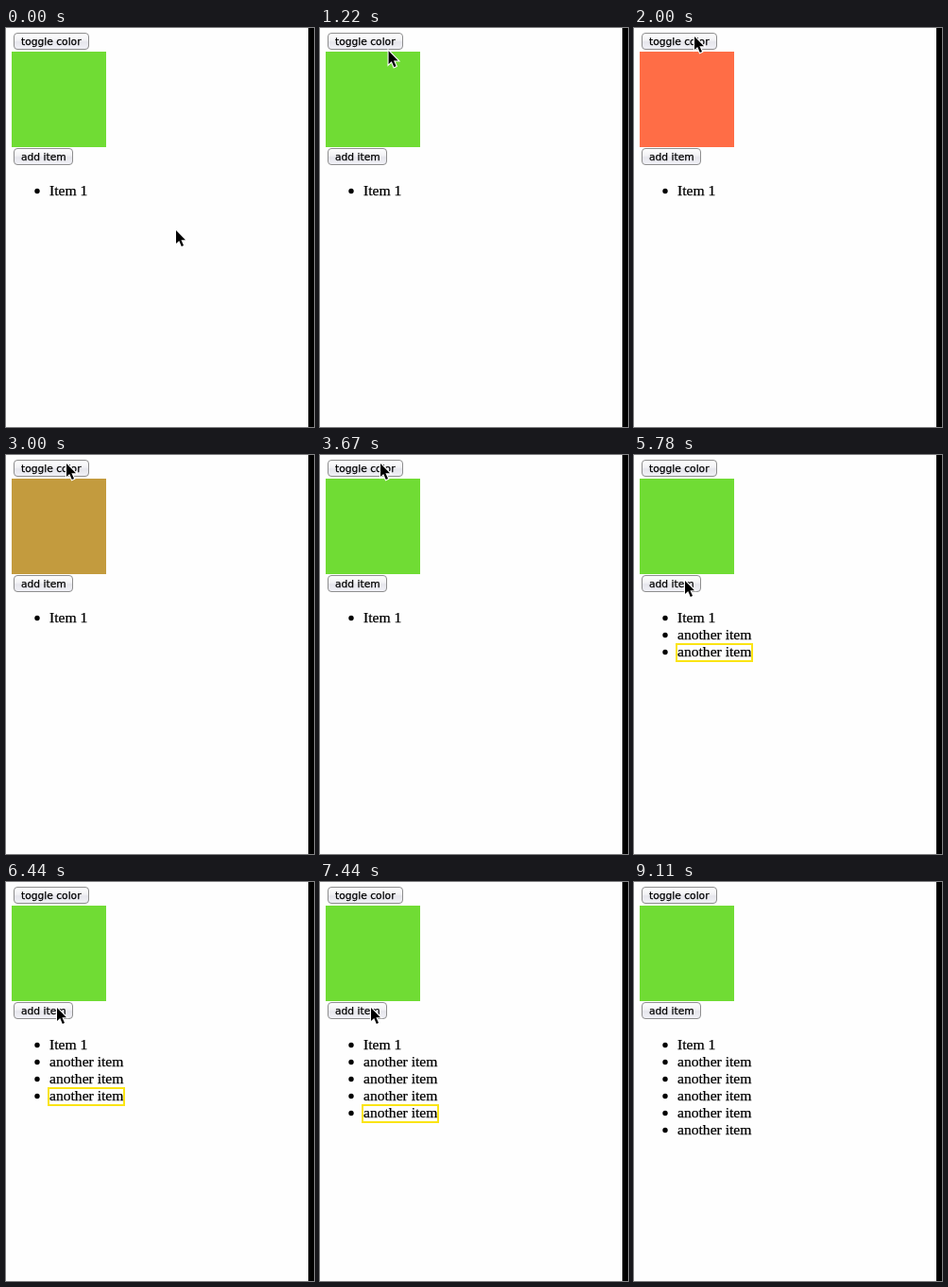
An HTML page with a canvas for the animation above (9.89 s loop, 326x422 px).

```html
<!DOCTYPE html>
<html lang="en">
<head>
<meta charset="utf-8">
<title>Toggle and add</title>
<style>
  html, body { margin: 0; width: 326px; height: 422px; overflow: hidden; }
  canvas { display: block; }
</style>
</head>
<body>
<canvas id="stage" width="326" height="422"></canvas>
<script>
const ctx = document.getElementById('stage').getContext('2d');
const LOOP = 9890, TICK = 1000 / 9;
const PAPER = '#fefefe';
const GREEN = [112, 220, 52], ORANGE = [255, 109, 70];
const ADDED = [45, 50, 57, 64, 72];      // ticks at which items appear
const GLOW = [0.3, 1, 1, 1, 0.4];        // highlight opacity per tick of age

// Eased progress from tick a to tick b
function ease(tick, a, b) {
  const p = Math.min(1, Math.max(0, (tick - a) / (b - a)));
  return p * p * (3 - 2 * p);
}

const mix = (from, to, p) => from.map((v, i) => v + (to[i] - v) * p);

// Black text, slightly emboldened
function drawText(text, x, y, font) {
  ctx.font = font;
  ctx.fillStyle = ctx.strokeStyle = '#000';
  ctx.lineWidth = 0.25;
  ctx.fillText(text, x, y);
  ctx.strokeText(text, x, y);
}

function drawButton(label, y, width) {
  const fill = ctx.createLinearGradient(0, y, 0, y + 18);
  fill.addColorStop(0, '#ffffff');
  fill.addColorStop(0.45, '#f2f2f5');
  fill.addColorStop(0.55, '#e6e6ec');
  fill.addColorStop(1, '#f2f2f8');
  ctx.beginPath();
  ctx.roundRect(8.5, y + 0.5, width - 1, 17, 3.5);
  ctx.fillStyle = fill;
  ctx.fill();
  ctx.strokeStyle = '#8e8e8e';
  ctx.lineWidth = 1;
  ctx.stroke();
  drawText(label, 16, y + 13, '10.7px "DejaVu Sans", sans-serif');
}

function drawItem(label, row, glow) {
  const y = 177 + row * 18;
  ctx.fillStyle = '#000';
  ctx.beginPath();
  ctx.arc(33, y - 4.5, 2.7, 0, Math.PI * 2);
  ctx.fill();
  drawText(label, 46, y, '15.6px "Liberation Serif", serif');
  if (glow) {
    ctx.strokeStyle = `rgba(250, 228, 20, ${glow})`;
    ctx.lineWidth = 2;
    ctx.strokeRect(45, y - 13, 80, 18);
  }
}

const arrow = new Path2D('M0 0V14L3.2 11L5.8 17L8 16L5.4 10.2H10Z');

function drawCursor(tick) {
  const onToggle = mix([180, 214], [64, 9], ease(tick, 6, 12));
  const [x, y] = mix(onToggle, [54, 133], ease(tick, 33, 41));
  ctx.save();
  ctx.translate(x, y);
  ctx.strokeStyle = PAPER;
  ctx.lineWidth = 2.2;
  ctx.stroke(arrow);
  ctx.fillStyle = '#000';
  ctx.fill(arrow);
  ctx.restore();
}

function draw(time) {
  const tick = Math.floor((time % LOOP + 5) / TICK);
  ctx.fillStyle = PAPER;
  ctx.fillRect(0, 0, 320, 422);
  ctx.fillStyle = '#000';
  ctx.fillRect(320, 0, 6, 422);

  const heat = ease(tick, 12, 18) - ease(tick, 23, 32);
  ctx.fillStyle = `rgb(${mix(GREEN, ORANGE, heat).map(Math.round)})`;
  ctx.fillRect(6, 25, 100, 101);

  drawButton('toggle color', 5, 80);
  drawButton('add item', 127, 63);
  drawItem('Item 1', 0);
  ADDED.forEach((start, i) => {
    if (tick >= start) drawItem('another item', i + 1, GLOW[tick - start]);
  });
  if (tick < 79) drawCursor(tick);
}

const begin = performance.now();
function frame() {
  draw(performance.now() - begin);
  requestAnimationFrame(frame);
}
frame();
</script>
</body>
</html>
```
